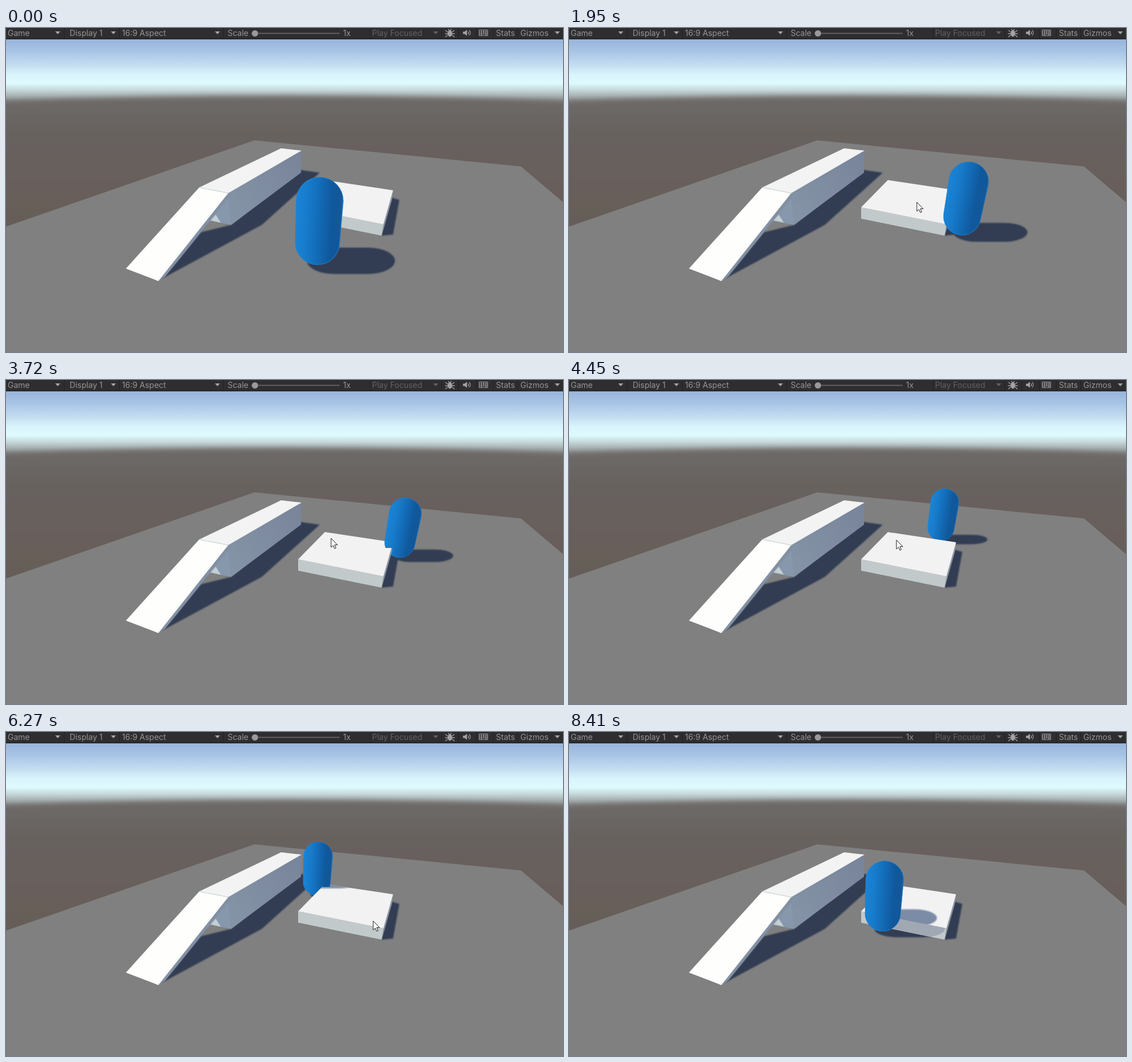
Write an HTML page that moves like this. It is 980 px wide and 571 px high and loops after 9210 ms.

```html
<!DOCTYPE html>
<html lang="en">
<head>
<meta charset="utf-8">
<title>Capsule walk</title>
<style>
html, body { margin: 0; width: 100%; height: 100%; overflow: hidden; background: #808080; }
svg { display: block; }
text { font: 14px Inter, Roboto, sans-serif; fill: #969696; }
</style>
</head>
<body>
<svg width="980" height="571" viewBox="0 0 980 571">
  <defs>
    <linearGradient id="sky" gradientUnits="userSpaceOnUse" x1="0" y1="20" x2="0" y2="130">
      <stop offset="0" stop-color="#98b5db"/>
      <stop offset=".2" stop-color="#a9c5e5"/>
      <stop offset=".4" stop-color="#c2dcf0"/>
      <stop offset=".56" stop-color="#d8f3fb"/>
      <stop offset=".7" stop-color="#e0fbfd"/>
      <stop offset=".8" stop-color="#c9dcde"/>
      <stop offset="1" stop-color="#8b8d8c"/>
    </linearGradient>
    <linearGradient id="earth" gradientUnits="userSpaceOnUse" x1="0" y1="118" x2="0" y2="340">
      <stop offset="0" stop-color="#6e6a69"/>
      <stop offset=".3" stop-color="#68625f"/>
      <stop offset="1" stop-color="#665d58"/>
    </linearGradient>
    <linearGradient id="wall" gradientUnits="userSpaceOnUse" x1="395" y1="330" x2="520" y2="235">
      <stop offset="0" stop-color="#8593a7"/>
      <stop offset="1" stop-color="#78859a"/>
    </linearGradient>
    <linearGradient id="body">
      <stop offset="0" stop-color="#1b84d6"/>
      <stop offset=".25" stop-color="#177bcb"/>
      <stop offset=".5" stop-color="#136bb6"/>
      <stop offset=".78" stop-color="#10589c"/>
      <stop offset=".95" stop-color="#125799"/>
      <stop offset="1" stop-color="#2069ab"/>
    </linearGradient>
    <linearGradient id="cap" x2="0" y2="1">
      <stop offset="0" stop-color="#1f92ea" stop-opacity=".85"/>
      <stop offset=".15" stop-color="#1c8be2" stop-opacity=".6"/>
      <stop offset=".36" stop-color="#1c8be2" stop-opacity="0"/>
      <stop offset=".78" stop-color="#0d4682" stop-opacity="0"/>
      <stop offset="1" stop-color="#0d4682" stop-opacity=".75"/>
    </linearGradient>
    <radialGradient id="glow" gradientUnits="userSpaceOnUse" cx="-9" cy="-84" r="17">
      <stop offset="0" stop-color="#4cb8ff"/>
      <stop offset=".4" stop-color="#36a5f8" stop-opacity=".75"/>
      <stop offset="1" stop-color="#1f92ea" stop-opacity="0"/>
    </radialGradient>
    <filter id="haze" x="-5%" y="-10%" width="110%" height="120%"><feGaussianBlur stdDeviation="5"/></filter>
    <filter id="soft" x="-10%" y="-20%" width="120%" height="140%"><feGaussianBlur stdDeviation=".9"/></filter>
    <clipPath id="topClip"><path d="M561 268L681 286L664 346L514 316Z"/></clipPath>
    <clipPath id="faceClip"><path d="M514 316L664 346L661 366L514 336Z"/></clipPath>
    <clipPath id="upperClip"><rect id="upper" y="20" width="980" height="0"/></clipPath>
    <clipPath id="view"><rect y="20" width="980" height="551"/></clipPath>
    <g id="pill">
      <path id="hull" fill="url(#body)"/>
      <use href="#hull" style="fill:url(#cap)"/>
      <path d="M-26.8 -73.2A26.8 26.8 0 0 1 26.8 -73.2L26 -55H-26Z" fill="url(#glow)"/>
      <use href="#hull" fill="none" stroke="#2b83cb" stroke-opacity=".55" stroke-width=".8"/>
    </g>
    <rect id="shade"/>
  </defs>

  <g clip-path="url(#view)">
    <rect y="20" width="980" height="130" fill="url(#sky)"/>
    <path d="M-40 130Q490 110 1020 130V420H-40Z" fill="url(#earth)" filter="url(#haze)"/>
    <path d="M0 350L437 198L906 244L980 307V571H0Z" fill="#808080"/>

    <g fill="#323e52" filter="url(#soft)">
      <path d="M517 250L552 255L450 347L274 442L288 428L343 360L396 347Z"/>
      <path d="M679 299L692 303L681 364L660 366Z"/>
    </g>
    <use href="#shade" fill="#323e52" filter="url(#soft)"/>

    <path d="M359 340L391 291L396 347Z" fill="#8798ac"/>
    <path d="M360 339L369 329L378 343Z" fill="#c3cfd2"/>
    <path d="M391 291L268 446L280 438L359 340L373 322L392 300Z" fill="#8290a5"/>
    <path d="M391 291L520 216L519 255L396 347Z" fill="url(#wall)"/>
    <path d="M340 281L484 212L520 216L391 291Z" fill="#f3f3f3"/>
    <path d="M340 281L391 291L268 446L211 424Z" fill="#fefefc"/>
    <path d="M340 281L391 291" stroke="#bfd0d3"/>

    <use id="back" href="#pill"/>
    <path d="M681 286L679 302L661 366L664 346Z" fill="#8c97a6"/>
    <path d="M514 316L664 346L661 366L514 336Z" fill="#c2c9ca"/>
    <path d="M561 268L681 286L664 346L514 316Z" fill="#f2f2f2"/>
    <g id="cast">
      <g clip-path="url(#faceClip)" fill="#a0a8b3">
        <use href="#shade"/><use class="lift" href="#shade"/>
      </g>
      <g clip-path="url(#topClip)"><use class="lift" href="#shade" fill="#7c8ba6" filter="url(#soft)"/></g>
    </g>
    <g id="over"><use id="front" href="#pill"/></g>
    <path id="cursor" d="M0 0V16L3.7 12.6L6.2 18.2L8.6 17.1L6.2 11.6H11.2Z" fill="#fff" stroke="#1c1c1c" stroke-linejoin="round"/>
  </g>

  <rect width="980" height="19.5" fill="#2e2e2e"/>
  <rect y="18.5" width="980" height="1.5" fill="#222"/>
  <g id="bar"></g>
  <g fill="#a3a3a3" stroke="#a3a3a3">
    <path d="M432 9.5H587" stroke="#606060" stroke-width="2"/>
    <circle cx="438" cy="9.5" r="5.5" fill="#999" stroke="none"/>
    <ellipse cx="781" cy="9.5" rx="3.6" ry="5.4"/>
    <path d="M773 4L777 7M789 4L785 7M772.5 10H789.5M773 16L777 12.5M789 16L785 12.5M778 2L780 4M784 2L782 4" fill="none" stroke-width="1.3"/>
    <path d="M804 6.5H807L811 3V14L807 10.5H804Z" stroke="none"/>
    <path d="M813 6Q815 8.500 813 11M815 4Q819 8.500 815 13" fill="none" stroke-width="1.2"/>
    <path d="M832.500 3.500H847.500V13.500H832.500ZM833 7H847M833 10.500H847M836.500 4V10M840.500 4V10M844.500 4V10M836.500 10.500V13M844.500 10.500V13" fill="none"/>
  </g>
</svg>
<script>
const LOOP = 9210;
const $ = id => document.getElementById(id);
const set = (el, attrs) => { for (const k in attrs) el.setAttribute(k, attrs[k]); };

// Toolbar
const labels = [[3, 'Game'], [112, 'Display 1'], [204, '16:9 Aspect'], [390, 'Scale'], [593, '1x'],
  [644, 'Play Focused', '#626262'], [862, 'Stats'], [905, 'Gizmos']];
const arrows = [91, 189, 372, 756, 970];
const rules = [102, 199, 382, 640, 766, 796, 827, 857, 900];
$('bar').innerHTML =
  rules.map(x => `<rect x="${x}" width="1" height="19" fill="#212121"/>`).join('') +
  labels.map(([x, s, c]) => `<text x="${x}" y="13.5"${c ? ` style="fill:${c}"` : ''}>${s}</text>`).join('') +
  arrows.map(x => `<path d="M${x - 4.5} 6H${x + 4.5}L${x} 11Z" fill="${x === 756 ? '#626262' : '#a3a3a3'}"/>`).join('');

// Capsule outline, 100 units tall, standing on the local zero point
$('hull').setAttribute('d', 'M-26.8 -73.2A26.8 26.8 0 0 1 26.8 -73.2L25.2 -25.2A25.2 25.2 0 0 1 -25.2 -25.2Z');

const ease = {
  lin: p => p,
  in: p => p ** 1.8,
  out: p => 1 - (1 - p) ** 2,
  io: p => p * p * (3 - 2 * p)
};

// [time, x, y, easing towards this key]
const walk = [
  [910, 548, 417], [1420, 609, 400, 'in'], [1810, 685, 376, 'lin'], [2000, 694, 361, 'lin'],
  [2600, 686, 343, 'out'], [2930, 686, 343], [3690, 693, 313, 'io'], [3740, 693, 313],
  [4280, 672, 288, 'in'], [4620, 637, 279, 'lin'], [5150, 583, 280, 'lin'], [5560, 550, 284, 'out'],
  [6050, 549, 285], [6510, 541, 297, 'in'], [6880, 514, 325, 'lin'], [7220, 499, 345, 'lin'],
  [7300, 497, 345, 'out'], [7500, 498, 345], [8250, 552, 351, 'io']
];
const mouse = [
  [60, 667, 572], [480, 615, 290, 'io'], [690, 612, 307, 'io'], [2740, 612, 307],
  [2920, 580, 278, 'io'], [2960, 580, 278], [3250, 559, 281, 'io'], [3600, 572, 279, 'io'],
  [4380, 572, 279], [4880, 646, 333, 'io'], [6550, 646, 333], [6740, 675, 357, 'io'],
  [7140, 564, 313, 'io'], [7650, 564, 313], [8400, 760, 573, 'io']
];

function at(keys, t) {
  const i = keys.findIndex(k => k[0] > t);
  if (i < 0) return keys[keys.length - 1].slice(1, 3);
  if (i === 0) return keys[0].slice(1, 3);
  const [a, b] = [keys[i - 1], keys[i]];
  const p = ease[b[3] || 'lin']((t - a[0]) / (b[0] - a[0]));
  return [a[1] + (b[1] - a[1]) * p, a[2] + (b[2] - a[2]) * p];
}

document.querySelectorAll('.lift').forEach(el => el.setAttribute('transform', 'translate(-14 -19)'));

function draw(t) {
  const [x, y] = at(walk, t);
  const h = 154 - 0.4615 * (417 - y);            // perspective height
  const lean = Math.atan((x - 490) / 1070) * 180 / Math.PI;
  const pose = `translate(${x} ${y}) scale(${h / 100}) rotate(${lean} 0 -25)`;
  set($('back'), { transform: pose });
  set($('front'), { transform: pose });

  const up = 0.00127 * h * h, down = 0.0007 * h * h;
  set($('shade'), {
    x: x - 0.12 * h, y: y - up, width: 1.005 * h, height: up + down,
    rx: 0.31 * h, ry: (up + down) / 2
  });
  set($('cast'), { visibility: y < 360 && x < 600 ? 'visible' : 'hidden' });

  // Beside or behind the block only the part above its top stays in front
  const inFront = y > (x < 600 ? 320 : 352);
  set($('upper'), { height: inFront ? 551 : y - 0.16 * h - 20 });
  set($('over'), { 'clip-path': 'url(#upperClip)' });

  const [mx, my] = at(mouse, t);
  set($('cursor'), { transform: `translate(${mx} ${my})` });
}

const start = performance.now();
function tick() {
  draw((performance.now() - start) % LOOP);
  requestAnimationFrame(tick);
}
tick();
</script>
</body>
</html>
```
